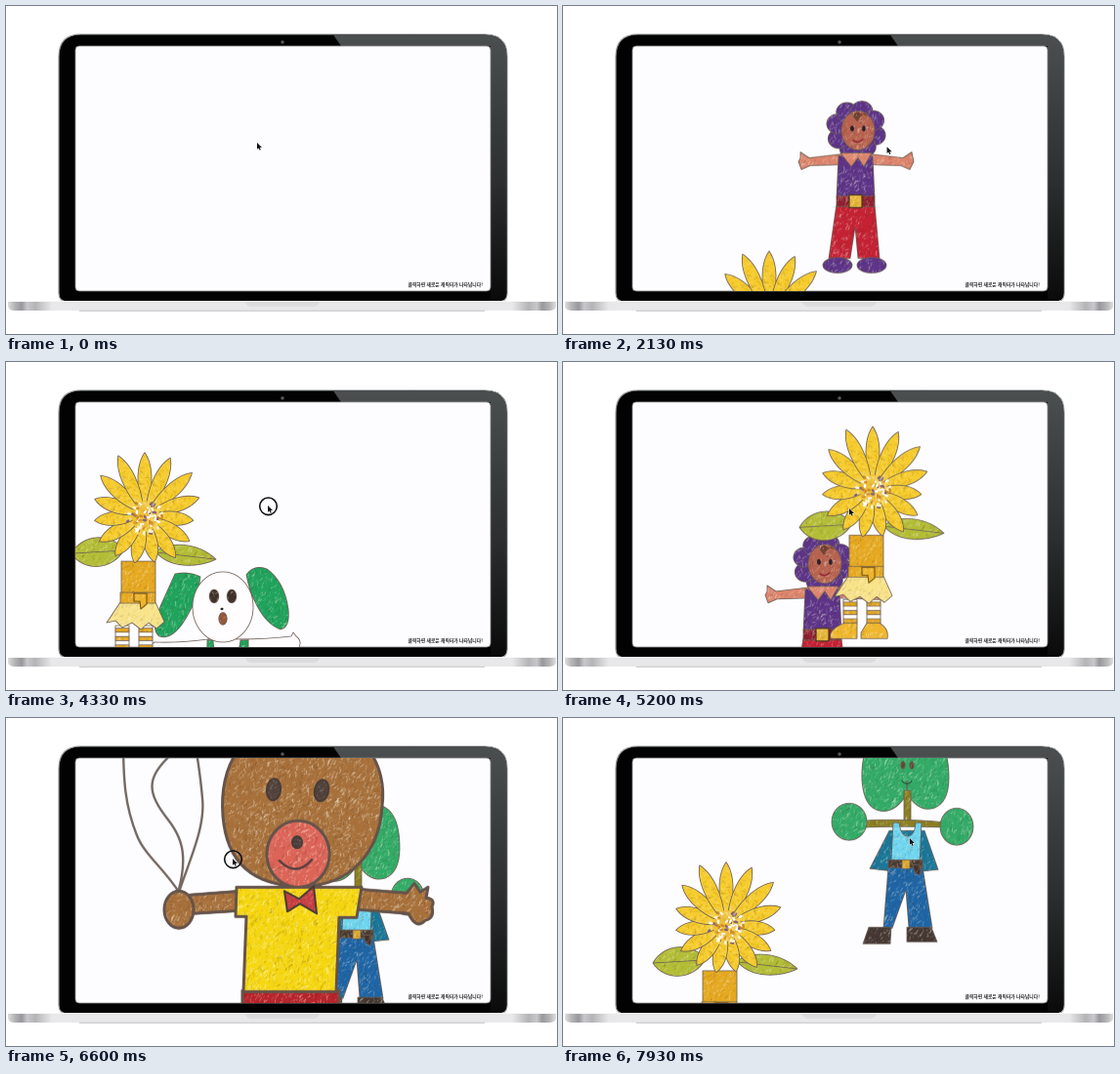
Recreate the animation shown at these times as an HTML page with a canvas. Size 564 px wide and 336 px high, loop 8 s.

```html
<!DOCTYPE html>
<html lang="ko">
<head>
<meta charset="utf-8">
<title>Crayon characters</title>
<style>
  html, body { margin: 0; width: 100%; height: 100%; overflow: hidden; background: #fff; }
  svg, canvas { position: absolute; left: 0; top: 0; display: block; }
  canvas { left: 71px; top: 41px; width: 425px; height: 251px; border-radius: 4px; }
  text { font: 700 4.8px "Noto Sans CJK KR", "Noto Sans CJK", sans-serif; fill: #222; }
</style>
</head>
<body>
<svg width="564" height="336" viewBox="0 0 564 336">
  <defs>
    <linearGradient id="gloss" x2="0" y2="1">
      <stop stop-color="#4b4f50"/><stop offset=".55" stop-color="#2c2e2f"/><stop offset="1" stop-color="#0a0a0a"/>
    </linearGradient>
    <linearGradient id="metal">
      <stop stop-color="#ddd"/><stop offset=".012" stop-color="#b5b5b8"/><stop offset=".025" stop-color="#98989c"/>
      <stop offset=".035" stop-color="#c8c8cb"/><stop offset=".05" stop-color="#b4b4b7"/><stop offset=".08" stop-color="#e8e8ea"/>
      <stop offset=".92" stop-color="#e8e8ea"/><stop offset=".95" stop-color="#b4b4b7"/><stop offset=".965" stop-color="#c8c8cb"/>
      <stop offset=".975" stop-color="#98989c"/><stop offset=".988" stop-color="#b5b5b8"/><stop offset="1" stop-color="#ddd"/>
    </linearGradient>
  </defs>
  <path d="M54 294V52Q54 29 77 29H490Q513 29 513 52V294Q513 303 504 303H63Q54 303 54 294Z" fill="#020202" stroke="#9a9c9d" stroke-width="1.200"/>
  <path d="M335 29.500H490Q512.500 29.500 512.500 52V294Q512 302 504 302H496V41H343Z" fill="url(#gloss)"/>
  <circle cx="283" cy="37" r="1.800" fill="#55585c"/>
  <rect x="71" y="41" width="425" height="251" rx="4" fill="#fdfcfe" stroke="#888" stroke-width=".8"/>
  <path d="M2 302H563V308Q562 312 556 312H9Q3 312 2 308Z" fill="url(#metal)"/>
  <path d="M2 302.500H563" stroke="#f8f8f8"/>
  <path d="M75 312.300H490" stroke="#b5b5b8" stroke-width=".8"/>
  <path d="M245 303H321Q320 308 314 308H252Q246 308 245 303Z" fill="#dcdcde"/>
</svg>
<canvas></canvas>
<svg width="564" height="336"><text x="411.500" y="286.700">클릭하면 새로운 캐릭터가 나타납니다!</text></svg>
<script>
const LOOP = 8000, FALL = 158, GROW = 0.29, HALF = 220;
const view = document.querySelector('canvas');
const dpr = window.devicePixelRatio || 1, detail = 2 * dpr;
view.width = 425 * dpr;
view.height = 251 * dpr;
const stage = view.getContext('2d');
stage.imageSmoothingQuality = 'high';

let seed = 7;
const rnd = (a = 0, b = 1) => {
  seed = (seed * 1664525 + 1013904223) % 4294967296;
  return a + (b - a) * seed / 4294967296;
};

function makeSurface(size) {
  const c = document.createElement('canvas');
  c.width = c.height = size;
  return c.getContext('2d');
}

// Tileable hatching that gives flat fills a wax crayon look
const grain = makeSurface(320);
grain.lineCap = 'round';
for (let i = 0; i < 3400; i++) {
  const x = rnd(0, 320), y = rnd(0, 320), a = rnd(-1.7, -0.3), l = rnd(1, 9);
  grain.strokeStyle = rnd() < 0.62 ? `rgba(255,255,240,${rnd(0.08, 0.4)})` : `rgba(60,30,0,${rnd(0.04, 0.18)})`;
  grain.lineWidth = rnd(0.8, 2.6);
  grain.beginPath();
  grain.moveTo(x, y);
  grain.lineTo(x + l * Math.cos(a), y + l * Math.sin(a));
  grain.stroke();
}

let pen, wax;

function ink(shape, fill, { rough = 0.85, line = '#6b5d54', width = 0.8 } = {}) {
  const path = typeof shape === 'string' ? new Path2D(shape) : shape;
  if (fill) {
    pen.fillStyle = fill;
    pen.fill(path);
    pen.globalAlpha = rough;
    pen.fillStyle = wax;
    pen.fill(path);
    pen.globalAlpha = 1;
  }
  if (width) {
    pen.strokeStyle = line;
    pen.lineWidth = width;
    pen.stroke(path);
  }
}

function oval(x, y, rx, ry, fill, opts, turn = 0) {
  const p = new Path2D();
  p.ellipse(x, y, rx, ry, turn, 0, 7);
  ink(p, fill, opts);
}

const box = (x, y, w, h, fill, opts) => ink(`M${x} ${y}h${w}v${h}h${-w}Z`, fill, opts);
const BARE = { width: 0 }, PLAIN = { rough: 0 };

function petals(x, y, count, reach, half, fill) {
  for (let i = 0; i < count; i++) {
    const a = i * 2 * Math.PI / count - Math.PI / 2;
    const r = reach(a) * rnd(0.95, 1.07);
    pen.save();
    pen.translate(x, y);
    pen.rotate(a);
    ink(`M8 -2C${r * 0.45} ${-half} ${r * 0.8} ${-half} ${r} 0C${r * 0.8} ${half} ${r * 0.45} ${half} 8 2Z`, fill);
    pen.restore();
  }
}

function speckles(x, y, radius, count, colors) {
  for (let i = 0; i < count; i++) {
    const a = rnd(0, 6.28), r = radius * Math.sqrt(rnd());
    oval(x + r * Math.cos(a), y + r * Math.sin(a), 2.2, 1.2, colors[i % colors.length], BARE, rnd(0, 3));
  }
}

function stripedLeg(x, y, w, h) {
  box(x, y, w, h, '#fffdf4', PLAIN);
  for (let k = 0; k < 3; k++) box(x, y + h * (0.1 + k * 0.33), w, h * 0.16, '#e3a622');
}

const cast = {
  flower: { cx: 210, cy: 153, draw() {
    ink('M190 146C176 129 148 129 136 150C148 169 178 168 190 146Z', '#b3bd36');
    ink('M222 148C238 137 266 139 284 156C266 165 236 166 222 148Z', '#b3bd36');
    ink('M137 150L189 147M223 149L283 156');
    box(187, 158, 35, 35, '#e5a820');
    stripedLeg(181, 224, 14, 26);
    stripedLeg(205, 224, 14, 26);
    ink('M182 248H195V264H168Q165 255 182 248Z', '#efb72c');
    ink('M205 248H218Q228 254 226 264H199V258Z', '#efb72c');
    ink('M186 200H222L231 220L223 227L215 221L207 228L198 221L188 226L181 219L172 221Z', '#f8e389');
    box(186, 190, 36, 11, '#e5a820');
    ink('M200 191H213V202L207 207L206 199H200Z', '#efb52b', { line: '#7a5410', width: 1.1 });
    petals(211, 111, 15, a => 51 - 16 * Math.min(0, Math.sin(a)), 9, '#f6cb2c');
    oval(211, 112, 13, 16, '#eec03a', BARE);
    speckles(211, 113, 18, 75, ['#fff6d5', '#d28a1e', '#f6d557', '#806078', '#fff']);
  } },

  bunny: { cx: 337, cy: 222, draw() {
    const leafGreen = '#20a35c';
    ink('M286 142Q300 139 312 145Q309 171 293 194Q281 210 270 206Q260 199 272 173Z', leafGreen);
    ink('M359 143Q367 132 380 137Q398 150 402 178Q404 197 394 199Q380 194 370 175Q362 160 359 143Z', leafGreen);
    ink('M320 209Q290 213 265 212Q256 218 263 226Q290 229 320 222Z', '#fffdfd', PLAIN);
    ink('M351 209Q380 209 405 206L407 202L410 206Q417 211 412 219Q385 223 352 222Z', '#fffdfd', PLAIN);
    ink('M318 271H363Q368 284 394 291L397 307H342L336 296L328 307H295L296 292Q314 285 318 271Z', '#a39b1f');
    oval(405, 291, 13, 7, leafGreen);
    oval(287, 299, 13, 7, leafGreen);
    box(320, 209, 41, 50, '#fffdfd', PLAIN);
    ink('M319 210H325Q326 231 338 231Q351 230 353 210H361V258H318Z', leafGreen);
    box(316, 258, 47, 14, '#8f9a30');
    for (let x = 320; x < 360; x += 13) box(x, 260, 7, 10, '#2b9a58');
    oval(366, 271, 5, 6, '#fffdfd', PLAIN);
    oval(335, 176, 31, 36, '#fffdfd', PLAIN);
    oval(326, 165, 4.8, 6.8, '#40302b');
    oval(344, 165, 4.8, 6.8, '#40302b');
    oval(334, 178, 1.5, 1.2, '#222', BARE);
    oval(335, 188, 4.2, 6.3, '#955a3b');
  } },

  violet: { cx: 266, cy: 270, draw() {
    const violet = '#5d3488', skin = '#dc846d';
    for (let i = 0; i < 8; i++) {
      const a = i * Math.PI / 4 + 0.3;
      oval(266 + 20 * Math.cos(a), 206 + 20 * Math.sin(a), 11, 10, violet);
    }
    ink('M252 231L218 235L209 229V235L207 239L210 247L219 243L252 242Z', skin);
    ink('M280 231L314 235L323 229L325 239L321 247L312 243L280 242Z', skin);
    ink('M246 282H285L290 338H268L265 306L260 338H238Z', '#c42234');
    oval(247, 345, 15, 8, violet);
    oval(282, 345, 15, 8, violet);
    ink('M248 233H283L285 276H246Z', violet);
    ink('M250 230H282L274 244L268 235L261 244Z', skin);
    box(246, 274, 39, 11, '#8d202f');
    box(259, 273, 13, 13, '#e6b638', { line: '#4c3522', width: 1.2 });
    oval(268, 207, 17, 20, '#b76350');
    ink('M254 193L261 190L267 198L274 189L281 194L268 188Z', '#704335', BARE);
    oval(262, 205, 2, 3, '#2d2028', BARE);
    oval(274, 205, 2, 3, '#2d2028', BARE);
    ink('M263 217Q268 221 273 216', null, { line: '#8e2630', width: 1.4 });
  } },

  dandelion: { cx: 0, cy: 0, draw() {
    const arm = side => {
      let d = 'M0 -18';
      for (let i = 1; i <= 7; i++) d += `L${side * i * 11} ${i % 2 ? -26 : -13}`;
      d += `L${side * 86} -8`;
      for (let i = 7; i >= 1; i--) d += `L${side * i * 11} ${i % 2 ? 8 : -5}`;
      ink(d + 'Z', '#3d9c61');
    };
    arm(-1);
    arm(1);
    box(-19, -30, 40, 52, '#edb52b');
    stripedLeg(-25, 50, 17, 44);
    stripedLeg(8, 50, 17, 44);
    ink('M-10 93V108H-42Q-42 96 -25 92Z', '#e8a821');
    ink('M8 93V108H40Q40 96 25 92Z', '#e8a821');
    ink('M-20 20H22L34 51L20 56L8 50L-6 57L-18 50L-34 54Z', '#fbf7ee', { rough: 0.2 });
    petals(0, -64, 25, () => 50, 6, '#efc62f');
    petals(0, -64, 17, () => 33, 6, '#e4b427');
    speckles(0, -64, 17, 40, ['#d4961e', '#f7dc62', '#a87822']);
  } },

  clover: { cx: 349, cy: 127, draw() {
    const green = '#33ab67', olive = '#8b7f22', denim = '#1f65a5';
    ink('M352 77Q341 97 325 95Q308 92 306 64Q304 22 330 17Q351 22 352 77Z', green);
    ink('M352 77Q364 97 380 92Q395 86 395 61Q395 22 374 17Q353 22 352 77Z', green);
    oval(352, 42, 13, 22, green, BARE);
    oval(348, 48, 2.2, 4, '#5c4630');
    oval(357, 48, 2.2, 4, '#5c4630');
    ink('M347 64Q352 70 357 64', null, { line: '#275b3b', width: 1.2 });
    ink('M334 115L314 154L340 157H365L384 155L370 115Z', '#1b7698');
    box(349, 74, 7, 34, olive);
    ink('M303 105Q350 102 395 107V112Q350 110 303 112Z', olive);
    oval(293, 106, 18, 19, green);
    oval(403, 111, 17, 19, green);
    ink('M333 152H368L378 215H354L351 176L337 215H328Z', denim);
    ink('M338 107H344Q346 121 353 121Q360 120 361 107H367L365 147H336Z', '#6fd5ef');
    box(333, 145, 35, 8, '#4b3b30');
    box(347, 145, 8, 9, '#dfab31');
    ink('M358 150L367 151L365 161L360 158Z', '#463328');
    ink('M313 214H336L335 231H307Z', '#453833');
    ink('M352 214H377L383 229H352Z', '#453833');
  } },

  bear: { cx: 290, cy: 147, draw() {
    const bold = { rough: 1, line: '#65534a', width: 3 };
    const fur = '#a8713c', dark = { rough: 0.5, line: '#493b36', width: 2 };
    const string = { line: '#756a62', width: 2.4 };
    ink('M177 178C160 152 142 140 134 120C122 90 120 65 120 22', null, string);
    ink('M177 175C186 140 180 122 166 104C144 76 144 62 166 40L168 12', null, string);
    ink('M177 178C190 140 204 110 201 82Q199 58 193 22', null, string);
    oval(128, -8, 25, 32, '#e05a4c', bold);
    oval(166, -20, 25, 32, '#f3cc3c', bold);
    oval(204, -8, 25, 32, '#4c91cb', bold);
    oval(247, 20, 22, 22, fur, bold);
    oval(362, 18, 22, 22, fur, bold);
    ink('M222 100C218 50 240 5 300 4C370 4 390 50 385 90C382 140 350 172 303 172C255 172 226 150 222 100Z', fur, bold);
    oval(274, 73, 7, 11, '#51423d', dark, 0.1);
    oval(323, 74, 7, 11, '#51423d', dark, 0.2);
    box(254, 312, 30, 40, fur, bold);
    box(304, 312, 30, 40, fur, bold);
    box(242, 279, 99, 38, '#b8242c', bold);
    ink('M240 177L188 181Q187 197 192 200L240 197Z', fur, bold);
    ink('M360 175L410 179L418 169L424 178L432 173L430 184Q440 185 436 193Q439 205 429 207Q420 217 412 200L360 196Z', fur, bold);
    oval(177, 196, 15, 19, fur, bold);
    ink('M236 173H364L359 204H341L338 280H243L246 203H235Z', '#f5d611', bold);
    oval(299, 139, 32, 34, '#dc6558', bold);
    oval(298, 127, 5, 6, '#493d3c', dark);
    ink('M280 146Q297 163 313 145', null, { line: '#5b4140', width: 2.5 });
    ink('M285 177L300 185L315 172L318 200L301 190L288 198Z', '#c63e42', dark);
  } }
};

for (const who of Object.values(cast)) {
  pen = makeSurface(HALF * 2 * detail);
  wax = pen.createPattern(grain.canvas, 'repeat');
  wax.setTransform(new DOMMatrix().scale(0.5));
  pen.scale(detail, detail);
  pen.translate(HALF - who.cx, HALF - who.cy);
  pen.lineJoin = pen.lineCap = 'round';
  who.draw();
  who.image = pen.canvas;
}

// Seconds, character, x, y
const clicks = [
  [0.37, 'bunny', 266, 148], [0.95, 'flower', 210, 137], [1.6, 'violet', 300, 146],
  [2.3, 'bunny', 337, 145], [2.9, 'dandelion', 253, 158], [3.36, 'bunny', 224, 148],
  [3.73, 'flower', 141, 142], [4.33, 'violet', 266, 150], [4.86, 'flower', 316, 154],
  [5.4, 'dandelion', 300, 150], [5.93, 'clover', 357, 128], [6.3, 'bear', 290, 133],
  [6.6, 'violet', 233, 148], [7.12, 'flower', 166, 150], [7.63, 'clover', 349, 113]
];

// Pointer path: seconds, x, y
const route = [
  [0, 257, 140], [0.37, 262, 142], [0.95, 211, 141], [1.27, 211, 141], [1.6, 300, 145],
  [2.3, 337, 144], [2.9, 253, 148], [3, 253, 148], [3.36, 225, 148], [3.73, 143, 146],
  [4.33, 268, 147], [4.86, 316, 152], [5.2, 293, 150], [5.4, 300, 149], [5.93, 357, 146],
  [6.3, 290, 144], [6.6, 232, 144], [7.12, 168, 148], [7.63, 353, 124], [8, 355, 123]
];

function pointerAt(t) {
  const i = route.findIndex(p => p[0] > t);
  const [t0, x0, y0] = route[i - 1], [t1, x1, y1] = route[i];
  const u = (t - t0) / (t1 - t0), k = u * u * (3 - 2 * u);
  return [x0 + (x1 - x0) * k, y0 + (y1 - y0) * k];
}

const arrow = new Path2D('M0 0V6.800L1.600 5.400L2.700 7.800L3.800 7.300L2.800 5H5Z');

function frame() {
  const t = performance.now() % LOOP / 1000;
  stage.setTransform(dpr, 0, 0, dpr, -71 * dpr, -41 * dpr);
  stage.clearRect(71, 41, 425, 251);
  let clicking = false;
  for (const [start, name, x, y] of clicks) {
    const age = t - start;
    if (age > -0.06 && age < 0.08) clicking = true;
    if (age <= 0 || age > 1.8) continue;
    const r = HALF * Math.min(1, age / GROW);
    stage.drawImage(cast[name].image, x - r, y + FALL * age * age - r, r * 2, r * 2);
  }
  const [px, py] = pointerAt(t);
  if (clicking) {
    stage.beginPath();
    stage.arc(px + 0.5, py + 0.8, 8.8, 0, 7);
    stage.strokeStyle = '#111';
    stage.lineWidth = 1.6;
    stage.stroke();
  }
  stage.translate(px, py);
  stage.strokeStyle = '#fff';
  stage.lineWidth = 1;
  stage.stroke(arrow);
  stage.fillStyle = '#111';
  stage.fill(arrow);
  requestAnimationFrame(frame);
}
frame();
</script>
</body>
</html>
```
